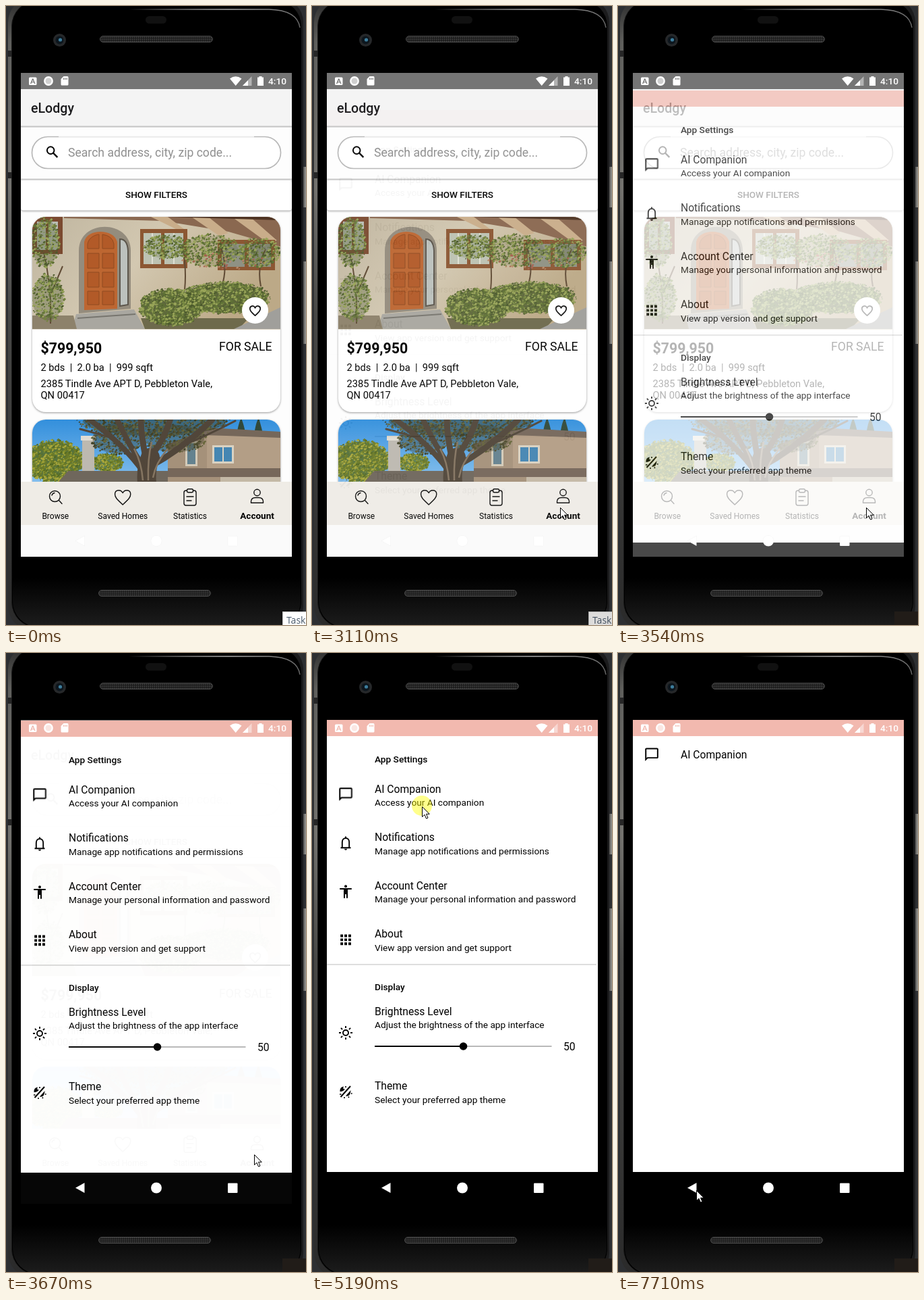
These frames come from a looping animation (445x916 px, 8 s). An HTML page:

```html
<!DOCTYPE html>
<html lang="en">
<head>
<meta charset="utf-8">
<title>Home finder</title>
<style>
  html, body { margin: 0; width: 100%; height: 100%; overflow: hidden; background: #2d2f32; }
  svg { display: block; width: 100%; height: 100%; }
  text { font: 13.7px Roboto, sans-serif; white-space: pre; }
  .med { font-weight: 500; }
  .item { font-size: 15.65px; }
  .fact { font-size: 14.67px; }
  .tab { font-size: 12px; text-anchor: middle; }
  .line { fill: none; stroke: #111; stroke-width: 1.4; stroke-linecap: round; stroke-linejoin: round; }
  .card { filter: drop-shadow(0 1px 1.5px #0006); }

  .cursor, .settings, .tip, .list, .detail, .ring { animation: 8s step-end infinite; }
  .cursor { animation-name: cursor; }
  .settings { animation-name: rise; }
  .tip { animation-name: tip; }
  .list { animation-name: list; }
  .detail { animation-name: detail; }
  .ring { opacity: 0; fill: #ffff00; fill-opacity: .45; }
  .r1 { animation-name: tap1; }
  .r2 { animation-name: tap2; }
  .r3 { animation-name: tap3; }

  @keyframes cursor {
    0% { transform: translate(321px, 824px); opacity: 0; }
    5.625% { transform: translate(321px, 824px); opacity: 1; animation-timing-function: steps(4); }
    9.125% { transform: translate(354px, 766px); animation-timing-function: steps(5, jump-none); }
    13.5% { transform: translate(368px, 737px); }
    16.25% { transform: translate(368px, 739px); }
    17.125% { transform: translate(368px, 741px); }
    18.875% { transform: translate(368px, 742px); }
    51.375% { transform: translate(368px, 742px); animation-timing-function: steps(3); }
    54% { transform: translate(201px, 308px); animation-timing-function: steps(3); }
    57% { transform: translate(177px, 258px); animation-timing-function: steps(5); }
    62% { transform: translate(163px, 227px); }
    82.125% { transform: translate(163px, 227px); animation-timing-function: steps(6); }
    87.4375% { transform: translate(146px, 560px); animation-timing-function: steps(6); }
    92.75% { transform: translate(117px, 793px); }
    93.625%, 100% { transform: translate(116px, 795px); opacity: 1; }
  }
  @keyframes rise {
    0% { transform: translateY(57px); opacity: 0; }
    38.875% { transform: translateY(55px); opacity: .04; }
    39.75% { transform: translateY(52px); opacity: .1; }
    40.625% { transform: translateY(49px); opacity: .2; }
    41.5% { transform: translateY(45.5px); opacity: .3; }
    42.375% { transform: translateY(35px); opacity: .5; }
    44.25% { transform: translateY(26px); opacity: .71; }
    45.875% { transform: translateY(1px); opacity: .98; }
    48.625%, 100% { transform: none; opacity: 1; }
  }
  @keyframes tip {
    0% { opacity: 1; }
    38.875% { opacity: .85; }
    39.75% { opacity: .7; }
    40.625% { opacity: .5; }
    41.5% { opacity: .35; }
    42.375% { opacity: .15; }
    44.25%, 100% { opacity: 0; }
  }
  @keyframes list { 0% { opacity: 1; } 75.75%, 100% { opacity: 0; } }
  @keyframes detail { 0% { opacity: 0; } 75.75%, 100% { opacity: 1; } }
  @keyframes tap1 { 0% { opacity: 0; } 22.5% { opacity: 1; } 24.25%, 100% { opacity: 0; } }
  @keyframes tap2 { 0% { opacity: 0; } 64.875% { opacity: 1; } 66.75%, 100% { opacity: 0; } }
  @keyframes tap3 { 0% { opacity: 0; } 94.625% { opacity: 1; } 96.375%, 100% { opacity: 0; } }
</style>
</head>
<body>
<svg viewBox="0 0 445 916" preserveAspectRatio="none">
  <defs>
    <linearGradient id="metal" x2="0" y2="1">
      <stop offset="0" stop-color="#2b2b2b"/><stop offset=".07" stop-color="#5f5f5c"/>
      <stop offset=".3" stop-color="#73726e"/><stop offset=".5" stop-color="#484846"/><stop offset="1" stop-color="#2a2a2a"/>
    </linearGradient>
    <linearGradient id="shine"><stop offset=".4" stop-color="#fff" stop-opacity="0"/><stop offset=".75" stop-color="#aaa"/><stop offset="1" stop-color="#666"/></linearGradient>
    <linearGradient id="chin" x2="0" y2="1"><stop offset=".3" stop-color="#000"/><stop offset="1" stop-color="#1d1d1d"/></linearGradient>
    <linearGradient id="key"><stop offset="0" stop-color="#444"/><stop offset="1" stop-color="#9a9994"/></linearGradient>
    <linearGradient id="wall" x2="1" y2=".4"><stop offset="0" stop-color="#bfb59f"/><stop offset=".5" stop-color="#d3c8b1"/><stop offset="1" stop-color="#bca987"/></linearGradient>
    <linearGradient id="sky" x2="0" y2="1"><stop offset="0" stop-color="#338fdc"/><stop offset="1" stop-color="#86c0ee"/></linearGradient>
    <pattern id="mesh" width="3" height="3" patternUnits="userSpaceOnUse"><rect width="3" height="3" fill="#1b1b1b"/><circle cx="1.5" cy="1.5" r=".9" fill="#444"/></pattern>
    <clipPath id="screen"><rect x="22" y="99" width="402" height="716"/></clipPath>
    <clipPath id="body"><rect x="22" y="304" width="402" height="400"/></clipPath>
    <clipPath id="pic1"><path d="M39 478.5V332a20 20 0 0 1 20-20H387a20 20 0 0 1 20 20V478.5z"/></clipPath>
    <clipPath id="pic2"><rect x="39" y="612" width="368" height="200" rx="20"/></clipPath>
    <path id="heart" d="M12 20.5C5 14 3 12 3 8.5C3 3.500 9.500 2.300 12 7C14.500 2.300 21 3.500 21 8.500C21 12 19 14 12 20.500z"/>
    <path id="chat" transform="scale(.978)" d="M20 2H4c-1.100 0-2 .9-2 2v18l4-4h14c1.100 0 2-.9 2-2V4c0-1.100-.9-2-2-2zm0 14H5.200L4 17.200V4h16v12z"/>
  </defs>

  <!-- handset -->
  <rect width="445" height="916" fill="#2d2f32"/>
  <rect x="440" y="238" width="5" height="60" fill="url(#key)"/>
  <rect x="440" y="378" width="5" height="122" fill="url(#key)"/>
  <rect x="3" y="-12" width="220" height="936" rx="36" fill="url(#metal)"/>
  <rect x="60" y="-12" width="381" height="936" rx="36" fill="#1c1c1d"/>
  <path d="M3 66h7v9H3zM3 246h7v9H3z" fill="#262626"/>
  <rect x="8.5" y="-8" width="430" height="928" rx="38" stroke="#1a1a1a"/>
  <rect x="10" y="815" width="427" height="104" rx="38" fill="url(#chin)"/>
  <path d="M12 40Q14 6 50 5H390Q432 6 436 32" fill="none" stroke="url(#shine)" stroke-width="1.500"/>
  <rect x="207" y="15" width="31" height="11" rx="5.500" fill="#111"/>
  <circle cx="79.500" cy="50.500" r="9.500" fill="#26282a"/><circle cx="79.500" cy="50.500" r="6" fill="#0d161d"/><circle cx="80.500" cy="50" r="2.600" fill="#3d7d9c"/>
  <rect x="139.500" y="44.500" width="167" height="9" rx="4.500" fill="url(#mesh)" stroke="#4a4a4a"/>
  <rect x="137.500" y="864.500" width="166" height="9" rx="4.500" fill="url(#mesh)" stroke="#4a4a4a"/>
  <rect x="410" y="896" width="35" height="20" fill="#211c18"/>
  <g class="tip"><rect x="410.500" y="896.500" width="36" height="21" fill="#fff" stroke="#ccc"/>
    <text x="416" y="914" fill="#4a5a6c" style="font:14px 'Open Sans',sans-serif">Task</text></g>

  <g clip-path="url(#screen)">
    <!-- home -->
    <rect x="22" y="99" width="402" height="716" fill="#fdfdfd"/>
    <rect x="22" y="99" width="402" height="24" fill="#757575"/>
    <rect x="22" y="123" width="402" height="55" fill="#f4f4f4"/>
    <path d="M22 178.500H424" stroke="#c4c4c4" stroke-width="2"/>
    <text x="37" y="157.500" class="med" style="font-size:19.600px" fill="#1c1c1e">eLodgy</text>
    <rect x="38.500" y="193.500" width="369" height="47" rx="23.500" fill="#fff" stroke="#b8b8b8" stroke-width="1.700"/>
    <path d="M78 193.200H368" stroke="#fff" stroke-opacity=".7" stroke-width="2"/>
    <g fill="none" stroke="#000" stroke-width="2"><circle cx="66.200" cy="213.600" r="5.300"/><path d="M70 217.500L76.300 223.800" stroke-width="2.400"/></g>
    <text x="92" y="223" style="font-size:17.600px" fill="#909090">Search address, city, zip code...</text>
    <path d="M22 256.500H424" stroke="#ccc" stroke-width="2"/>
    <rect x="22" y="258" width="402" height="44.500" rx="4" fill="#fff" class="card"/>
    <text x="223" y="284" class="med" style="font-size:13.500px" text-anchor="middle">SHOW FILTERS</text>

    <g clip-path="url(#body)">
      <rect x="39" y="312" width="368" height="289" rx="20" fill="#fff" class="card"/>
      <g clip-path="url(#pic1)">
        <rect x="39" y="312" width="368" height="167" fill="url(#wall)"/>
        <path d="M39 312H84V367H39z" fill="#7b4a30"/><path d="M46 319H59V361H46zM63 319H77V361H63z" fill="#b9bdb3"/>
        <path d="M86 312H407V356L330 334L232 318L86 314z" fill="#8a6850"/>
        <path d="M215 312L258 333H268L240 312zM275 312L316 340L330 336L300 312zM335 312L386 349L402 347L362 312z" fill="#c9ad8a"/>
        <path d="M236 312H407V317z" fill="#4e3323"/>
        <path d="M108 455V362C108 315 185 315 185 362V448z" fill="#948c7d"/>
        <path d="M116 450V349C120 329 160 329 165 349V448z" fill="#bd6631"/>
        <g fill="#b25a28" stroke="#8f4a20"><path d="M121 352C123 341 135 338 138 338V359H121zM143 338Q158 340 160 352V359H143z"/><path d="M121 366h17v22h-17zM143 366h17v22h-17zM121 394h17v22h-17zM143 394h17v22h-17zM121 422h17v20h-17zM143 422h17v20h-17z"/></g>
        <path d="M169 444V345Q180 345 181 362V442z" fill="#bcc1bd" stroke="#5c564c" stroke-width="2"/>
        <path d="M104 456L190 449L206 478H98z" fill="#a9a7a0"/><path d="M106 462L192 456" stroke="#77756e" stroke-width="2"/>
        <path d="M199 330H269V388H199z" fill="#8c5733"/><path d="M204 336H230V382H204zM235 336H263V382H235z" fill="#bdc2b2"/>
        <path d="M217 336V382M249 336V382" stroke="#ebe8de" stroke-width="1.500"/>
        <path d="M314 346H399V391H314z" fill="#8c5733"/><path d="M320 352H354V386H320zM360 352H393V386H360z" fill="#8f9184"/>
        <path d="M39 458H100L105 478H39z" fill="#8d826b"/>
        <path d="M200 462H360L345 478H206z" fill="#6e6a4c"/>
        <path d="M338 478L407 446V478z" fill="#a09f9b"/>
        <g fill="none" stroke="#5f4a34" stroke-width="2"><path d="M66 470Q68 415 56 365M67 425L84 385M265 420Q268 390 262 355M320 415Q330 385 318 355M378 415Q372 385 385 360"/></g>
        <g id="plants"></g>
      </g>
      <circle cx="369.500" cy="450.500" r="19.500" fill="#fff"/>
      <use href="#heart" transform="translate(359.200 440.500) scale(.86)" fill="none" stroke="#111" stroke-width="2"/>
      <text x="51.500" y="514" style="font-size:21.300px;font-weight:700">$799,950</text>
      <text x="394.500" y="509.500" style="font-size:17.600px" text-anchor="end">FOR SALE</text>
      <text x="51.500" y="539.500" class="fact">2 bds  |  2.0 ba  |  999 sqft</text>
      <text x="51.500" y="563.500" class="fact">2385 Tindle Ave APT D, Pebbleton Vale,</text>
      <text x="51.500" y="580.500" class="fact">QN 00417</text>

      <rect x="39" y="612" width="368" height="200" rx="20" fill="#fff" class="card"/>
      <g clip-path="url(#pic2)">
        <rect x="39" y="612" width="368" height="95" fill="url(#sky)"/>
        <path d="M341 640Q345 615 349 610Q355 625 356 640zM367 640Q371 613 375 610Q380 625 382 640z" fill="#31493a"/>
        <path d="M240 648L300 628L407 633V704H240z" fill="#a5917a"/>
        <path d="M298 636H407V690H298z" fill="#b39e86"/>
        <path d="M236 650L302 624L407 630V639L300 635L241 658z" fill="#75675a"/>
        <path d="M306 650H338V677H306z" fill="#d9d2c2"/><path d="M309 653H321V674H309zM323 653H335V674H323z" fill="#4586b2"/>
        <path d="M266 644H284V681H266z" fill="#d3cab8"/><path d="M269 647H281V678H269z" fill="#64828f"/>
        <path d="M240 684H407V697H240z" fill="#76675a"/>
        <path d="M318 697H407V704H318z" fill="#c4b9a6"/>
        <g id="hedge"></g>
        <path d="M113 640H131V692H113z" fill="#bdb9b0"/><path d="M111 636H133V643H111z" fill="#e0dcd3"/>
        <path d="M78 704L92 688H240V704z" fill="#6f675c"/>
        <g id="crown"></g>
        <g fill="none" stroke="#51463a" stroke-linecap="round">
          <path d="M209 706Q207 685 214 668" stroke-width="28"/>
          <path d="M204 690Q176 650 124 612M203 680Q182 650 164 610" stroke-width="8"/>
          <path d="M208 672Q200 635 200 610M214 668Q236 640 244 610M216 680Q262 655 306 612" stroke-width="9"/>
          <path d="M160 640Q140 634 110 626M250 655Q290 640 340 614" stroke-width="3"/>
        </g>
        <path d="M203 702Q201 675 190 655M211 702Q210 670 216 645M218 698Q222 676 240 655" fill="none" stroke="#857561" stroke-width="2.500"/>
      </g>
    </g>

    <rect x="22" y="704" width="402" height="64" fill="#efece6"/>
    <g class="line">
      <circle cx="72.500" cy="725.500" r="8"/><path d="M78.500 731.500L83 736.500M68 724Q69 721 72 720.500"/>
      <use href="#heart" transform="translate(157.700 711.500) scale(1.290)" stroke-width="1.100"/>
      <rect x="264" y="717" width="18" height="22" rx="3"/><rect x="268.500" y="714.800" width="9" height="5" rx="2" fill="#efece6"/><path d="M268 726H278M268 732H275"/>
      <circle cx="372.500" cy="720" r="4.700"/><path d="M363.500 735.300V733Q364 727.500 370 727.500H375Q381 727.500 381.500 733V735.300z"/>
    </g>
    <text x="73.300" y="758.500" class="tab">Browse</text>
    <text x="173.300" y="758.500" class="tab">Saved Homes</text>
    <text x="273" y="758.500" class="tab">Statistics</text>
    <text x="372.500" y="758.500" class="tab" style="font-size:13.500px;font-weight:700">Account</text>
    <rect x="22" y="768" width="402" height="47" fill="#fafafa"/>

    <!-- settings -->
    <g class="settings">
      <rect x="22" y="99" width="402" height="24" fill="#f2b9af"/>
      <rect x="22" y="123" width="402" height="645" fill="#fff"/>
      <rect x="22" y="768" width="402" height="60"/>
      <g class="list">
        <text x="93" y="162" class="med">App Settings</text>
        <text x="93" y="499" class="med">Display</text>
        <g id="rows"></g>
        <use href="#chat" x="38.300" y="197.300"/>
        <g fill="none" stroke="#000" stroke-width="1.900">
          <path d="M42.500 288.300H57.500M44.800 288V280C44.800 272 55.200 272 55.200 280V288M50 274V271.500"/>
          <circle cx="50" cy="562" r="4"/>
          <path id="rays"/>
        </g>
        <path d="M48 289.800H52A2 2 0 0 1 48 289.800z"/>
        <circle cx="50" cy="345.300" r="2"/><path d="M41.200 348H58.800V350H53V362.700H51V357H49V362.700H47V350H41.200z"/>
        <path id="grid"/>
        <path d="M22 461H422" stroke="#dedede" stroke-width="2"/>
        <path d="M224 582H355.500" stroke="#b9b9b9" stroke-width="2"/><path d="M93 582H224" stroke="#000" stroke-width="2"/>
        <circle cx="224.500" cy="582" r="5.800"/>
        <text x="373" y="588" class="item">50</text>
        <path d="M42.500 657L57 641" stroke="#000" stroke-width="2"/>
        <path d="M47 641.500Q41 642 41.500 649Q47 649 49 645Q45 646 47 641.500z"/>
        <path d="M57.500 647L50 655.500Q57 657 57.500 647z"/>
        <path d="M50 641v2M41 653h2.500M58 651.500l1.500.8M54 656.500l.8 1.500M48 657v2" stroke="#000" stroke-width="1.600"/>
      </g>
      <g class="detail">
        <use href="#chat" x="38.300" y="138.500"/>
        <text x="93" y="156" class="item">AI Companion</text>
      </g>
    </g>

    <!-- system icons -->
    <g fill="#fff">
      <path fill-rule="evenodd" d="M35.500 105.500h8.500q1.500 0 1.500 1.500v8.500q0 1.500-1.500 1.500h-8.500q-1.500 0-1.500-1.500V107q0-1.500 1.500-1.500zM39 107.500L36 115h1.500l.6-1.700h3.300l.6 1.700h1.500L40.500 107.500zM39.750 109.300L38.600 112.200h2.300z"/>
      <circle cx="63" cy="111" r="5.700" fill-opacity=".65" stroke="#fff" stroke-width="2.400"/>
      <path fill-rule="evenodd" d="M85.500 104H91q1.500 0 1.500 1.500V116q0 1.500-1.500 1.500H83q-1.500 0-1.500-1.500V108zM85 106.500v2.500h1.200v-2.500zM87.300 106.500v2.500h1.200v-2.500zM89.600 106.500v2.500h1.200v-2.500z"/>
      <path d="M332 107.500Q340.500 101 349.500 107.500L340.700 118z"/>
      <path d="M364.500 104V118H351z" fill-opacity=".45"/><path d="M359 110V118H351z"/>
      <path d="M375.500 104h4v1.500h2.500V118h-9V105.500h2.500z"/>
      <text x="389" y="116.200" class="med" style="font-size:13.700px">4:10</text>
      <g stroke="#000" stroke-opacity=".025">
        <path d="M103 791.500L116.500 784V799z"/><circle cx="223" cy="791.500" r="8"/><rect x="329" y="784.500" width="14.500" height="14.500" rx="1"/>
      </g>
    </g>
  </g>

  <circle class="ring r1" cx="367" cy="741" r="15"/>
  <circle class="ring r2" cx="163" cy="226" r="15"/>
  <circle class="ring r3" cx="116" cy="794" r="15"/>
  <path class="cursor" d="M.5.500V15.500L4 12.200L6.500 18L9 17L6.500 11.300H11.200z" fill="#fff" stroke="#000"/>
</svg>
<script>
  const $ = id => document.getElementById(id);
  const NS = 'http://www.w3.org/2000/svg';
  const add = (parent, tag, attrs) => {
    const el = document.createElementNS(NS, tag);
    for (const k in attrs) el.setAttribute(k, attrs[k]);
    return parent.appendChild(el);
  };

  let seed = 7;
  const rnd = () => (seed = seed * 16807 % 2147483647) / 2147483647;

  // Scatter leaf dabs over a shaded ellipse, one path per colour.
  function leaves(id, cx, cy, rx, ry, count, colors, shade = .35, size = 1.7) {
    add($(id), 'ellipse', { cx, cy, rx: rx * .92, ry: ry * .92, fill: colors[0], opacity: shade });
    for (const fill of colors) {
      let d = '';
      for (let i = 0; i < count; i++) {
        const a = rnd() * Math.PI * 2, r = Math.sqrt(rnd()), s = size * (.5 + rnd());
        const x = cx + Math.cos(a) * r * rx, y = cy + Math.sin(a) * r * ry;
        d += `M${(x - s).toFixed(1)} ${y.toFixed(1)}l${s.toFixed(1)} ${(-s).toFixed(1)} ${s.toFixed(1)} ${(s * .6).toFixed(1)} ${(-s).toFixed(1)} ${s.toFixed(1)}z`;
      }
      add($(id), 'path', { d, fill });
    }
  }
  const greens = ['#4c5a2c', '#74853f', '#5f7136', '#98a458'];
  const golds = ['#55691f', '#87922e', '#aba83c', '#6c7a26'];
  const dark = ['#3f4026', '#67663a', '#504e2f'];
  leaves('plants', 58, 350, 22, 38, 80, greens);
  leaves('plants', 62, 432, 25, 36, 90, greens);
  leaves('plants', 238, 357, 34, 18, 80, greens, .2);
  leaves('plants', 302, 362, 46, 24, 120, greens, .2);
  leaves('plants', 375, 365, 32, 22, 80, greens, .2);
  leaves('plants', 330, 378, 70, 12, 25, ['#a5604e', '#b98a6a'], 0);
  leaves('plants', 245, 446, 48, 28, 280, greens, .85);
  leaves('plants', 325, 432, 68, 24, 320, greens, .85);
  leaves('hedge', 72, 674, 44, 32, 280, golds, .85);
  leaves('hedge', 150, 676, 24, 14, 80, golds, .7);
  leaves('crown', 220, 614, 115, 24, 260, dark, .5);
  leaves('crown', 165, 640, 40, 24, 90, dark, .4);
  leaves('crown', 250, 640, 48, 22, 100, dark, .4);

  [
    [206.5, 'AI Companion', 'Access your AI companion'],
    [278, 'Notifications', 'Manage app notifications and permissions'],
    [349.7, 'Account Center', 'Manage your personal information and password'],
    [421.2, 'About', 'View app version and get support'],
    [535.5, 'Brightness Level', 'Adjust the brightness of the app interface'],
    [646, 'Theme', 'Select your preferred app theme']
  ].forEach(([y, title, note]) => {
    add($('rows'), 'text', { x: 93, y, class: 'item' }).textContent = title;
    add($('rows'), 'text', { x: 93, y: y + 19.5 }).textContent = note;
  });

  let dots = '', rays = '';
  for (let i = 0; i < 9; i++) dots += `M${42.2 + i % 3 * 5.9} ${416.5 + Math.floor(i / 3) * 5.9}h3.9v3.9h-3.9z`;
  for (let i = 0; i < 8; i++) {
    const c = Math.cos(i * Math.PI / 4), s = Math.sin(i * Math.PI / 4);
    rays += `M${50 + 7 * c} ${562 + 7 * s}L${50 + 10 * c} ${562 + 10 * s}`;
  }
  $('grid').setAttribute('d', dots);
  $('rays').setAttribute('d', rays);
</script>
</body>
</html>
```
